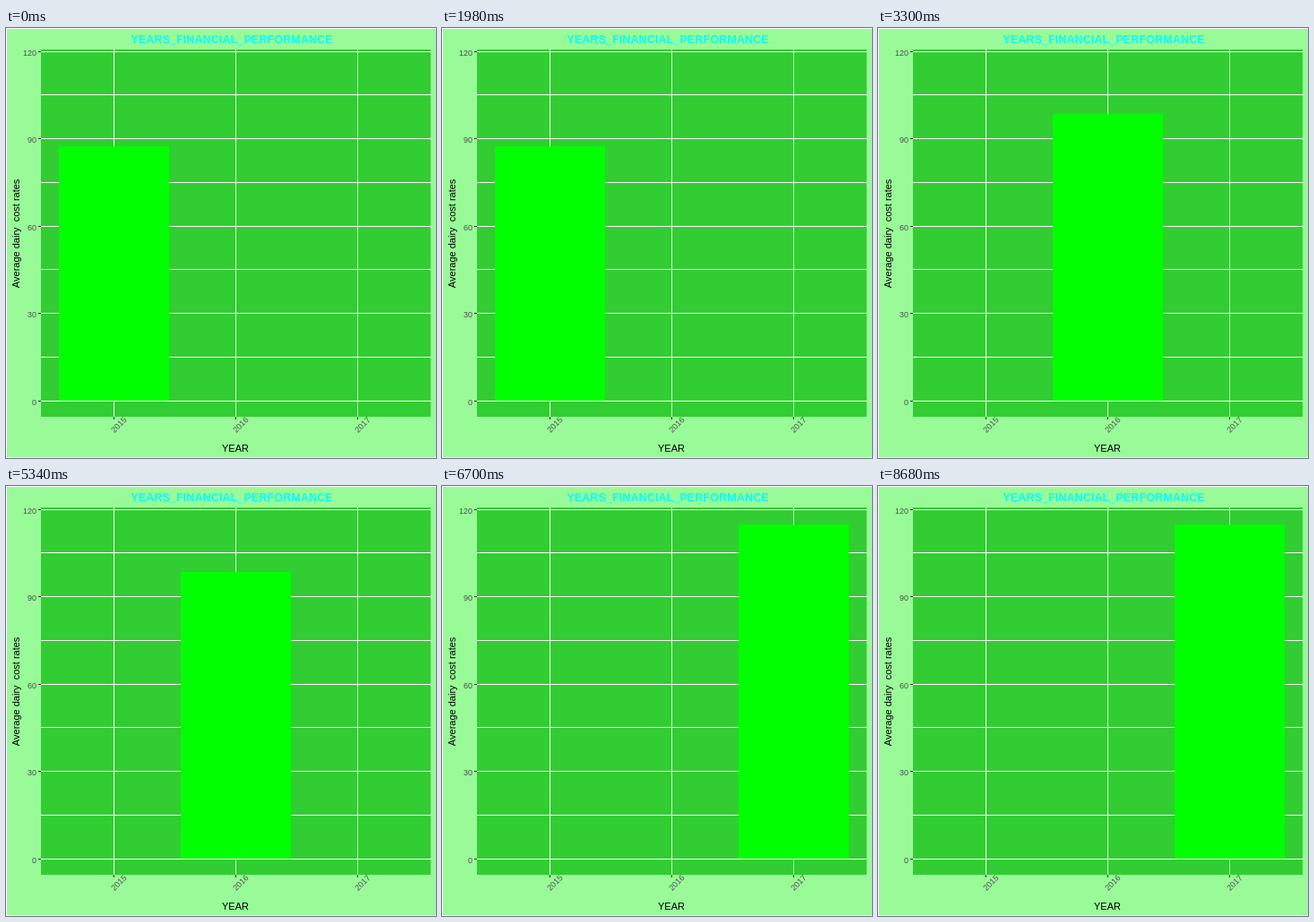
These frames come from a looping animation (480x480 px, 10000 ms). An HTML page:

```html
<!DOCTYPE html>
<html lang="en">
<head>
<meta charset="utf-8">
<title>Yearly bars</title>
<style>
  html, body { margin: 0; width: 100%; height: 100%; overflow: hidden; background: #98fb98; }
  svg { display: block; width: 100vw; height: 100vh; }
  text { font-family: "Liberation Sans", Arial, sans-serif; font-kerning: none; text-anchor: middle; white-space: pre; }
  .tick { font-size: 9px; fill: #4d4d4d; }
  .axis { font-size: 11px; fill: #000; }
  .title { font-size: 12.7px; font-weight: bold; fill: #0ff; }
</style>
</head>
<body>
<svg id="chart" viewBox="0 0 480 480"></svg>
<script>
const chart = document.getElementById('chart');
const LOOP = 10000;
const bars = [
  { year: 2015, x: 120, top: 132, from: 0 },
  { year: 2016, x: 256, top: 96, from: 3300 },
  { year: 2017, x: 392, top: 43, from: 6700 }
];

function add(tag, attrs, content) {
  const el = document.createElementNS('http://www.w3.org/2000/svg', tag);
  for (const key in attrs) el.setAttribute(key, attrs[key]);
  if (content !== undefined) el.textContent = content;
  return chart.appendChild(el);
}
const box = (x, y, width, height, fill) => add('rect', { x, y, width, height, fill });
const label = (cls, x, y, content, more) => add('text', { class: cls, x, y, ...more }, content);

box(0, 0, 480, 480, '#fff');
box(1, 1, 479, 478, '#98fb98');
box(39, 24, 435, 410, '#32cd32');

// Horizontal grid: a line every 15 units, a label every 30
for (let value = 0; value <= 120; value += 15) {
  const y = Math.floor(416 - value * 3.25);
  const major = value % 30 === 0;
  box(39, y, 435, 1, '#fff');
  if (major) {
    box(36, y, 3, 1, '#333');
    label('tick', 34, y + 4.5, value, { style: 'text-anchor:end' });
  }
}

for (const { year, x } of bars) {
  box(x, 24, 1, 410, '#fff');
  box(x, 434, 1, 3, '#333');
  label('tick', 0, 3, year, { transform: `translate(${x + 6} 443) rotate(-45)` });
}

label('title', 252, 17, 'YEARS_FINANCIAL_PERFORMANCE');
label('axis', 256, 473, 'YEAR');
label('axis', 0, 0, 'Average dairy  cost rates', { transform: 'translate(15 229.5) rotate(-90)' });

for (const bar of bars) bar.el = box(bar.x - 61, bar.top, 123, 416 - bar.top, '#0f0');

function draw(now) {
  const t = now % LOOP;
  bars.forEach((bar, i) => {
    const end = i + 1 < bars.length ? bars[i + 1].from : LOOP;
    bar.el.setAttribute('visibility', t >= bar.from && t < end ? 'visible' : 'hidden');
  });
}

const start = performance.now();
function loop() {
  draw(performance.now() - start);
  requestAnimationFrame(loop);
}
loop();
</script>
</body>
</html>
```
